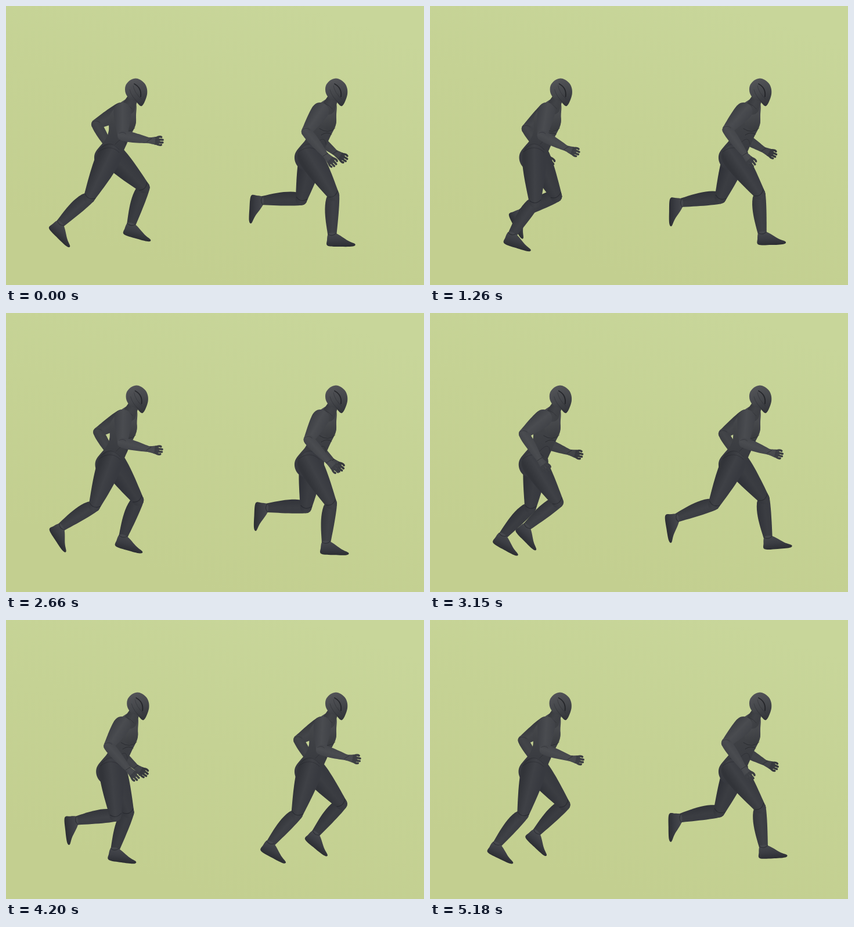
An HTML page with a canvas for the animation above (5.25 s loop, 720 px wide and 480 px high).

```html
<!DOCTYPE html>
<html>
<head>
<meta charset="utf-8">
<title>Two runners</title>
<style>
html, body { margin: 0; width: 100%; height: 100%; overflow: hidden; background: #c5d294; }
canvas { display: block; }
</style>
</head>
<body>
<canvas id="stage" width="720" height="480"></canvas>
<script>
const ctx = document.getElementById('stage').getContext('2d');
const LOOP = 5250, STEP = 70, STRIDES = 4, TAU = Math.PI * 2;
const THIGH = 79, SHANK = 72;
const SEAM = 'rgba(24,26,31,.5)', FAINT = 'rgba(24,26,31,.3)';

const NEAR_LEG = ['#323439', '#3f4146', '#383a40'], FAR_LEG = ['#303238', '#3b3d42', '#37393f'];
const NEAR_ARM = ['#3c3e43', '#4a4c50', '#404247'], FAR_ARM = ['#36383d', '#434549', '#3b3d42'];

// Outlines, relative to the figure's origin (the foot: to its ankle).
const FOOT = [[-6, -6], [-9, 5], [-8, 15], [14, 17], [35, 17], [39, 13], [27, 7], [7, -6]];
const TORSO = [[44, 158], [24, 169], [8, 190], [7, 214], [1, 230], [-17, 254], [-14, 274], [2, 283],
  [20, 275], [34, 246], [43, 226], [53, 205], [54, 188], [54, 168]];
const HEAD = [[43, 160], [36, 150], [36, 137], [45, 127], [57, 125], [70, 135], [73, 152], [64, 172], [53, 164]];

// Sum of harmonics, each given as a cosine and a sine weight.
const wave = (p, ...harmonics) => harmonics.reduce((sum, [a, b], i) =>
  sum + a * Math.cos(TAU * p * (i + 1)) + b * Math.sin(TAU * p * (i + 1)), 0);

// Leg angles in radians over a stride; jogging dampens the swing.
function gait(p, jog) {
  const calm = 1 - .45 * jog, rad = Math.PI / 180;
  return {
    thigh: rad * (9.5 + (1 - .2 * jog) * wave(p, [19.7, -32], [-.5, 3.7], [2.7, 2.7])),
    shank: rad * (-39.8 - 6 * jog + calm * wave(p, [41, -11.4], [-5.2, -10.2], [2.2, 1])),
    foot: rad * (36.8 + calm * wave(p, [-47.3, 9.4], [8.3, 3], [.8, -1.7]))
  };
}

function ramp(x0, y0, x1, y1, ...colors) {
  const g = ctx.createLinearGradient(x0, y0, x1, y1);
  colors.forEach((c, i) => g.addColorStop(i / (colors.length - 1), c));
  return g;
}

// Smooth closed shape through the points.
function blob(pts, fill) {
  const n = pts.length, at = i => pts[(i + n) % n];
  ctx.beginPath();
  ctx.moveTo(...pts[0]);
  for (let i = 0; i < n; i++) {
    const [a, b, c, d] = [at(i - 1), at(i), at(i + 1), at(i + 2)];
    ctx.bezierCurveTo(b[0] + (c[0] - a[0]) / 6, b[1] + (c[1] - a[1]) / 6,
      c[0] - (d[0] - b[0]) / 6, c[1] - (d[1] - b[1]) / 6, c[0], c[1]);
  }
  ctx.fillStyle = fill;
  ctx.fill();
}

// Curved line through a start, a control and an end point.
function seam(x0, y0, cx, cy, x1, y1, color = SEAM, width = 1) {
  ctx.beginPath();
  ctx.moveTo(x0, y0);
  ctx.quadraticCurveTo(cx, cy, x1, y1);
  ctx.lineWidth = width;
  ctx.strokeStyle = color;
  ctx.stroke();
}

// Rounded taper from radius r0 to r1 with a muscle bulge in front and behind.
function limb(x0, y0, x1, y1, r0, r1, front, back, tones) {
  const dx = x1 - x0, dy = y1 - y0, len = Math.hypot(dx, dy) || 1;
  const nx = dy / len, ny = -dx / len;
  const edge = (u, side, bulge) => {
    const w = side * (r0 + (r1 - r0) * u + bulge * Math.sin(Math.PI * u ** .7));
    ctx.lineTo(x0 + dx * u + nx * w, y0 + dy * u + ny * w);
  };
  const mx = x0 + dx * .4, my = y0 + dy * .4;
  ctx.fillStyle = ramp(mx - nx * 16, my - ny * 16, mx + nx * 16, my + ny * 16, ...tones);
  ctx.beginPath();
  for (let i = 0; i <= 12; i++) edge(i / 12, 1, front);
  for (let i = 12; i >= 0; i--) edge(i / 12, -1, back);
  ctx.fill();
  for (const [x, y, r] of [[x0, y0, r0], [x1, y1, r1]]) {
    ctx.beginPath();
    ctx.arc(x, y, r, 0, TAU);
    ctx.fill();
  }
}

function leg(hx, hy, p, jog, tones) {
  const { thigh, shank, foot } = gait(p, jog);
  const kx = hx + THIGH * Math.sin(thigh), ky = hy + THIGH * Math.cos(thigh);
  const ax = kx + SHANK * Math.sin(shank), ay = ky + SHANK * Math.cos(shank);
  limb(kx, ky, ax, ay, 10, 7, 1, 5, tones);
  limb(hx, hy, kx, ky, 21, 10, 2, 2, tones);
  ctx.save();
  ctx.translate(kx, ky);
  ctx.rotate(-thigh);
  seam(-9, -2, 0, 6, 10, -3);
  ctx.restore();
  ctx.save();
  ctx.translate(ax, ay);
  ctx.rotate(foot);
  blob(FOOT, ramp(0, -5, 0, 17, '#45474c', '#3b3d43', '#2c2e33'));
  seam(-7, -5, 0, 0, 7, -6);
  ctx.restore();
}

function arm(p, shift, tones) {
  const s = Math.cos(TAU * (p - .29));
  const sx = 27 + 3.5 * s + shift, sy = 181;
  const ex = 8 + 23 * s, ey = 219 + 10 * s - 6 * s * s;
  const hx = 62 + 39 * s, hy = 271 - 17.5 * s - 22 * s * s;
  const wx = ex + (hx - ex) * .66, wy = ey + (hy - ey) * .66 + 2;
  const dx = hx - wx, dy = hy - wy;
  limb(sx, sy, ex, ey, 15, 8.5, 1, 1, tones);
  limb(ex, ey, wx, wy, 8.5, 5, 1.5, 1.5, tones);
  limb(wx, wy, wx + dx * .5, wy + dy * .5, 5, 7, 0, 0, tones);
  ctx.lineCap = 'round';
  for (const k of [-.36, -.12, .12, .34]) {
    seam(wx + dx * .5 - dy * k * .6, wy + dy * .5 + dx * k * .6,
      wx + dx * .75 - dy * k, wy + dy * .75 + dx * k,
      wx + dx * (1 - k * k) - dy * k * .8, wy + dy * (1 - k * k) + dx * k * .8, tones[0], 3.6);
  }
  seam(ex - 6, ey - 4, ex + 1, ey - 8, ex + 6, ey - 3, FAINT);
  seam(wx - 4, wy + 2, wx, wy - 1, wx + 4, wy - 3);
}

function torso() {
  blob(TORSO, ramp(20, 165, 22, 282, '#4a4c4f', '#3f4145', '#393b40', '#36383e'));
  ctx.beginPath();
  ctx.ellipse(40, 195, 14, 19, -.1, 0, TAU);
  ctx.fillStyle = ramp(34, 178, 44, 214, '#4d4f52', '#393b3f');
  ctx.fill();
  seam(25, 211, 40, 221, 52, 210);
  seam(28, 222, 38, 215, 46, 221);
  seam(18, 238, 34, 220, 36, 238, FAINT);
}

function head() {
  limb(40, 175, 49, 157, 12, 9, 0, 0, ['#3a3c40', '#414347', '#333539']);
  blob(HEAD, ramp(46, 126, 64, 172, '#535458', '#45474b', '#313338'));
  seam(51, 134, 64, 141, 62, 156, 'rgba(25,27,31,.75)', 1.8);
  seam(49, 137, 51, 149, 63, 160, FAINT);
  seam(43, 144, 46, 157, 61, 169, FAINT);
}

function runner(x, phase, jog) {
  ctx.save();
  ctx.translate(x, 0);
  arm(phase + .5, 5, FAR_ARM);
  leg(12, 256, phase + .5, jog, FAR_LEG);
  torso();
  leg(8, 258, phase, jog, NEAR_LEG);
  seam(-8, 246, 8, 228, 25, 247, FAINT);
  seam(-11, 251, 9, 236, 25, 252, FAINT);
  head();
  seam(22, 170, 36, 163, 47, 177, FAINT);
  arm(phase, 0, NEAR_ARM);
  ctx.restore();
}

function draw(now) {
  const t = Math.floor(now % LOOP / STEP) * STEP / LOOP;
  const middle = Math.sin(Math.PI * t) ** 2;
  ctx.fillStyle = ramp(520, 0, 360, 480, '#c8d69a', '#c5d294', '#c3cf90');
  ctx.fillRect(0, 0, 720, 480);
  // The left runner drifts in cadence, sways and eases into a jog mid-loop.
  const left = STRIDES * t + .26 + .08 * middle + wave(t, [0, -.038], [0, 0], [0, .082]);
  runner(172 + 2 * Math.cos(2 * TAU * left), left, middle ** 2);
  runner(515, STRIDES * t, 0);
}

const start = performance.now();
function tick() {
  draw(performance.now() - start);
  requestAnimationFrame(tick);
}
tick();
</script>
</body>
</html>
```
